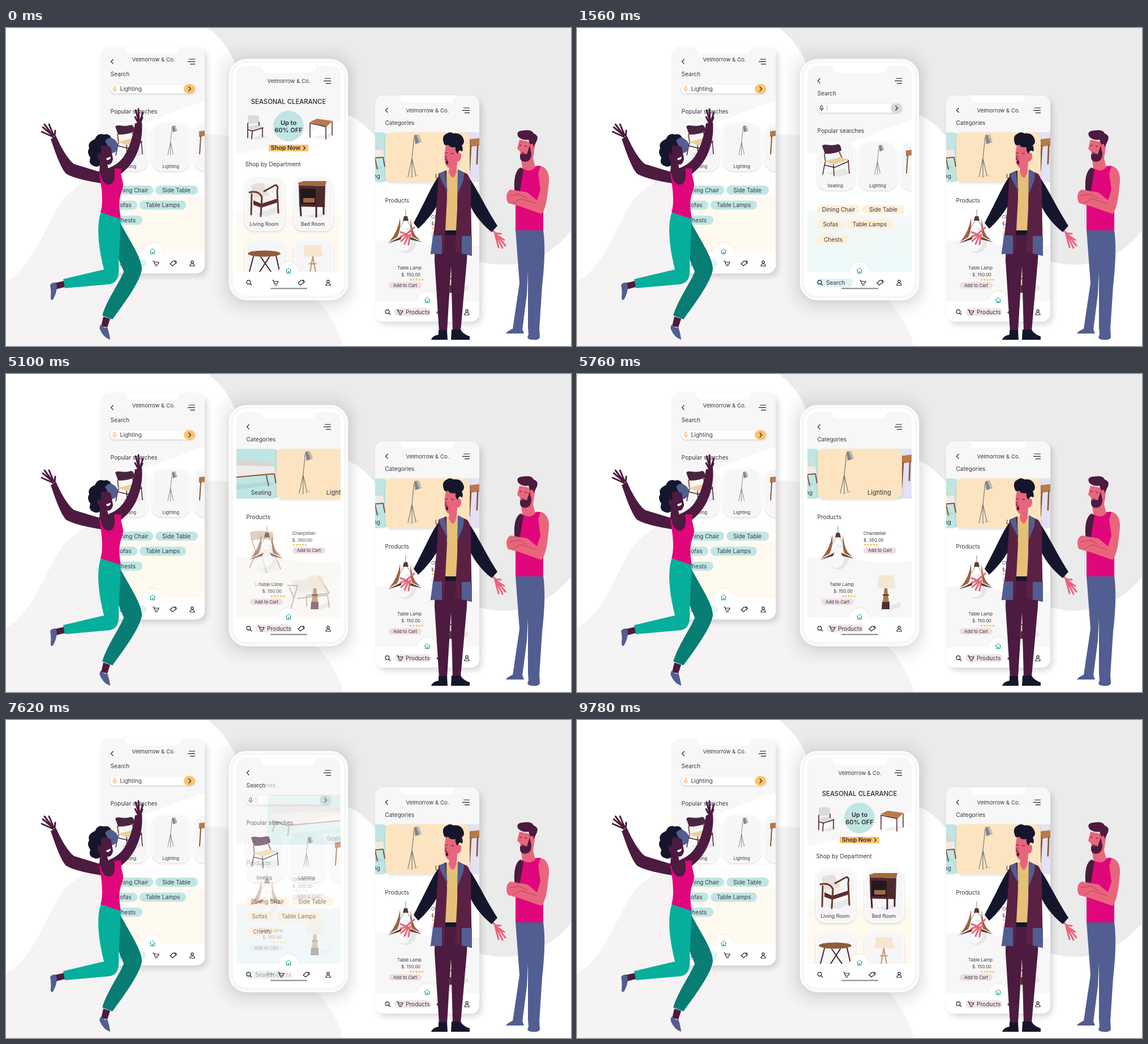
Write an HTML page that moves like this. It is 998 px wide and 561 px high and loops after 9.84 s.

```html
<!DOCTYPE html>
<html lang="en">
<head>
<meta charset="utf-8">
<title>Furniture shop app</title>
<style>
html,body{margin:0;width:100%;height:100%;overflow:hidden;background:#fff}
svg{display:block;width:998px;height:561px;font:10.1px Inter,"Open Sans",sans-serif;fill:#3b3542}
.m{text-anchor:middle}.e{text-anchor:end}
.s{font-size:7.8px}.b{font-weight:600}
.l{fill:none;stroke:#2b1c38;stroke-width:1.2}
.w{fill:none;stroke:#8a5638;stroke-width:2;stroke-linecap:round;stroke-linejoin:round}
.d{fill:none;stroke:#4a2030;stroke-width:2;stroke-linecap:round}
.card{fill:#f6f6f7;stroke:#fff;stroke-width:1.5;filter:drop-shadow(0 2px 2px #0002)}
.chip{fill:var(--chip)}
.hand{fill:none;stroke-width:3;stroke-linecap:round;stroke-linejoin:round}
.cart{transform:translateX(var(--cart,0px))}
.tag{transform:translateX(var(--tag,0px))}
.onSearch{opacity:var(--search,0)}
.onProducts{opacity:var(--products,0)}
.slide{transform:translateX(var(--slide,0px))}
.seats{opacity:calc(1 - var(--lights,1))}
.lights{opacity:var(--lights,1)}
#left{--chip:#bfe6e4;--accent:#fdc46b;--mic:#f5b04c;--tint:url(#cream);--search:1;--cart:29px;--tag:14px}
#right{--products:1;--cart:-25px}
#empty{--chip:#fff0d8;--accent:#d8d8da;--mic:#3b2a3a;--tint:url(#mint)}
#typed{--chip:#fdf4e0;--accent:#fdc46b;--mic:#f5b04c;--tint:none}
</style>
</head>
<body>
<svg viewBox="0 0 998 561">
<defs>
  <linearGradient id="cream" x2="0" y2="1"><stop stop-color="#fffaf0" stop-opacity="0"/><stop offset=".4" stop-color="#fffaf0"/></linearGradient>
  <linearGradient id="mint" x2="0" y2="1"><stop stop-color="#ecfaf8" stop-opacity="0"/><stop offset="1" stop-color="#e9f9f7"/></linearGradient>
  <clipPath id="screen"><rect x="407" y="67" width="184" height="399" rx="15"/></clipPath>

  <g id="back">
    <path fill="#f7f7f8" d="M407 67h184v399H407z"/>
    <path fill="#fff" d="M407 222C470 214 530 180 591 163V330C530 342 470 316 407 324z"/>
  </g>
  <path id="notch" fill="#fff" d="M446 66c5 0 5 4 6 7s4 6 9 6h76c5 0 8-3 9-6s1-7 6-7z"/>
  <path id="menu" class="l" d="M563 89h11M561 93.300h13M565 97.600h9"/>
  <path id="prev" class="l" d="M429.500 89l-4 4.200 4 4.200"/>

  <g id="lamp">
    <path class="l" style="stroke:#777" d="M12 4L8 42M8 42L1 75M8 42L8 76M8 42L15 73"/>
    <path fill="#858585" d="M12 1L20 0 25 13 14 17z"/>
    <path fill="#bbb" d="M16 1L20 0 25 13 21 14z"/>
  </g>
  <g id="table">
    <path fill="#b9794a" d="M0 4L36 0V9L0 14z"/>
    <path class="w" d="M3 13L1 44M12 12L11 36"/>
  </g>

  <g id="nav">
    <circle cx="499" cy="430" r="17" fill="#fff" style="filter:drop-shadow(0 -1px 1px #0001)"/>
    <path fill="#fff" d="M407 430h184v36H407z"/>
    <path class="l" style="stroke:#14a294;stroke-width:1" d="M494 428l5-4.500 5 4.500M495.500 427v5.500h7V427M498 432.500v-3h2v3"/>
    <g class="onSearch"><rect x="422" y="442" width="66" height="15" rx="7.500" fill="#dff3f1"/><text x="440" y="453">Search</text></g>
    <g class="onProducts"><rect x="441" y="442" width="65" height="14" rx="7" fill="#f3e6e9"/><text x="461" y="453">Products</text></g>
    <g class="l">
      <path d="M431 451l3 3"/><circle cx="428.500" cy="448.500" r="3.400"/>
      <path class="cart" d="M470 445h2l2 6h5l2-4h-8M474 453.500h5"/>
      <path class="tag" d="M516 450l5-5h5v4l-6 4.500zM523 446l4 1-1 3"/>
      <circle cx="569" cy="447" r="2.200"/><path d="M565 454q0-4 4-4t4 4z"/>
    </g>
  </g>

  <g id="search">
    <use href="#back"/><path fill="var(--tint)" d="M407 285h184v181H407z"/>
    <use href="#menu"/><use href="#prev"/>
    <text x="424.500" y="119">Search</text>
    <rect x="424" y="133.500" width="150" height="16" rx="8" fill="#fff" style="filter:drop-shadow(0 1px 1.500px #0003)"/>
    <rect x="554" y="133" width="20" height="17" rx="8.500" fill="var(--accent)"/>
    <path class="l" d="M562.500 137.500l4 4-4 4"/>
    <g style="stroke:var(--mic);fill:none"><rect x="430.500" y="136.500" width="3" height="6" rx="1.500"/><path d="M428.500 141q0 3.500 3.500 3.500t3.500-3.500M432 144.500v2.500"/></g>
    <text x="424.500" y="184.800">Popular searches</text>
    <rect class="card" x="425" y="201" width="65" height="84" rx="18"/>
    <rect class="card" x="499" y="201" width="65" height="84" rx="18"/>
    <rect class="card" x="573" y="201" width="65" height="84" rx="18"/>
    <path fill="#0001" d="M440 257l32-10 12 9-20 6z"/>
    <path fill="#4a2540" d="M433 208q2-3 8-2 12 2 20-1 5 0 6 11-10 6-29 6z"/>
    <path class="w" d="M437 222l2 15M463 218l5 11"/>
    <path fill="#e8cf9d" d="M437 235l28-7 15 4-26 9z"/>
    <path class="d" style="stroke-width:1.500" d="M438 238l-4 20M453 241l1 20M479 233l2 23M438 242l17 4 25-11"/>
    <use href="#lamp" transform="translate(525 206) scale(.7)"/>
    <use href="#table" transform="translate(581 212)"/>
    <g class="m s"><text x="456" y="281">Seating</text><text x="531" y="281">Lighting</text></g>
    <g class="chip">
      <rect x="424" y="312" width="76" height="16" rx="8"/><rect x="504" y="312" width="75" height="16" rx="8"/>
      <rect x="424" y="338.500" width="48" height="16" rx="8"/><rect x="476" y="338.500" width="82" height="16" rx="8"/>
      <rect x="424" y="365" width="57" height="16" rx="8"/>
    </g>
    <g class="m">
      <text x="462" y="323.700">Dining Chair</text><text x="541" y="323.700">Side Table</text>
      <text x="448" y="350">Sofas</text><text x="517" y="350">Table Lamps</text><text x="452.500" y="376.600">Chests</text>
    </g>
  </g>
  <text id="query" x="441.500" y="144.700">Lighting</text>

  <text id="stars" fill="#f5a623" style="font-size:5px">★★★★★</text>
  <g id="buy"><rect width="58" height="11" rx="5.500" fill="#eedde3"/><text class="m s" x="29" y="8.300">Add to Cart</text></g>

  <g id="categories">
    <use href="#back"/>
    <path class="seats" fill="url(#cream)" d="M407 285h184v181H407z"/>
    <use href="#menu"/><use href="#prev"/>
    <text x="424.500" y="119">Categories</text>
    <g class="slide">
      <path fill="#e3e1f3" d="M565 132h149v88H565z"/><use href="#table" transform="translate(572 139) scale(1.350)"/>
      <rect x="276" y="132" width="154" height="88" rx="11" fill="#bfe6e4"/>
      <path fill="#0001" d="M295 202l115-12 12 5-90 12z"/>
      <path fill="#d9d5d0" d="M280 142q70 6 135 15l4 12-110 2-25-9z"/>
      <path fill="#efece8" d="M283 167l60-6 78 2 2 12-112 11-26-10z"/>
      <path class="w" d="M285 177l26 9 110-10M290 180l-5 16M314 187l-2 17M407 179l4 18M421 176l3 16"/>
      <text x="380" y="213">Seating</text>
      <rect x="425" y="132" width="149" height="88" rx="11" fill="#fde4c0" style="filter:drop-shadow(0 2px 2px #0002)"/>
      <path fill="#0001" d="M466 212l16-7 4 4z"/><use href="#lamp" x="464" y="136"/>
      <text x="513" y="212.500" style="font-size:11px">Lighting</text>
    </g>
    <text x="424.500" y="256">Products</text>
    <use href="#stars" x="506" y="303"/><use href="#buy" x="506" y="306"/>
    <use href="#stars" x="467" y="393.500"/><use href="#buy" x="431" y="396.500"/>
    <g class="seats s">
      <text x="504" y="283.500">Dining Chair</text><text x="504" y="295.500">$. 250.00</text>
      <text class="e" x="489" y="374">Lounge Chair</text><text class="e" x="487" y="386">$. 350.00</text>
      <path fill="#0001" d="M437 345l38-8 12 6-25 9z"/>
      <path fill="#a77950" d="M431 279q17-5 40 0l2 14q-20-4-40 1z"/>
      <path fill="#d7b48c" d="M433 314l37-6 15 8-35 8z"/>
      <path class="w" d="M434 292l8 24-12 26M452 322l8 28M469 292l3 18 13 34"/>
      <path fill="#ddd8d0" d="M505 365l53-6 11 28-57 4z"/><path fill="#eeeae4" d="M508 386l50-4 12 6-55 6z"/>
      <path class="w" d="M498 373h17l-12 42M515 396l53-6 3 21M553 357l18 30-40 4v19M501 377l7 17"/>
    </g>
    <g class="lights s">
      <text x="506" y="283.500">Chandelier</text><text x="506" y="295.500">$. 350.00</text>
      <text class="e" x="489" y="374">Table Lamp</text><text class="e" x="487" y="386">$. 150.00</text>
      <ellipse cx="461" cy="323" rx="19" ry="22" fill="#e6e6e8"/><ellipse cx="457" cy="322" rx="15" ry="20" fill="#f8f8f8"/>
      <path class="l" style="stroke:#777;stroke-width:.9" d="M461 268v17M461 283l-13 22M461 283l13 22"/>
      <path fill="#9b633f" d="M451 283q2 20-5 34l-14 8q15-17 19-42zM470 283q1 20 8 31l9 9-15-7q-4-16-2-33z"/>
      <path fill="#5b3a35" d="M429 328l26-13-3 6zM490 326l-24-11 3 6zM458 280h6l2 8h-10z"/>
      <path fill="#0001" d="M546 411l25-9 1 8-18 7z"/>
      <path fill="#f3e8d3" d="M534 355h25l4 23h-33z"/><path fill="#ad7850" d="M543 378h5l3 24h-11z"/>
      <path fill="#4f3030" d="M539 402h13v13h-14zM540 389h11v2h-11z"/>
    </g>
  </g>

  <g id="home">
    <use href="#back"/><path fill="url(#cream)" d="M407 285h184v181H407z"/><use href="#menu"/>
    <text class="m" x="499.500" y="97" style="font-size:9.600px">Velmorrow &amp; Co.</text>
    <g class="m b" fill="#2f2836">
      <text x="499" y="134" style="font-size:11.300px;font-weight:500">SEASONAL CLEARANCE</text>
      <circle cx="499" cy="173" r="27" fill="#bfe6e3"/>
      <text x="499" y="170.500" style="font-size:11px">Up to</text><text x="499" y="184" style="font-size:11px">60% OFF</text>
      <path fill="#fdc46b" d="M464 206h70v11.500h-70z"/><text x="494" y="215.400" style="font-size:10.600px">Shop Now</text>
    </g>
    <path class="l" d="M525 208l3.500 3.700-3.500 3.700"/>
    <path fill="#0001" d="M432 195l21-8 7 5-15 5zM540 193l30-7 7 4-12 6z"/>
    <path fill="#dedad8" d="M427 155q10-3 20 0v13l-20 2zM426 174l20-4 9 5-20 6z"/>
    <path class="d" style="stroke-width:1.600" d="M427 168v26M447 166v6M435 181l-1 15M453 177v15M427 179l8 3 19-6"/>
    <path fill="#b9794a" d="M536 166l13-6 28 4-11 10z"/><path class="d" style="stroke-width:1.500" d="M537 168v25M565 174v22M576 166v23M537 168l28 6"/>
    <text x="422.500" y="244.300">Shop by Department</text>
    <rect class="card" x="423" y="262" width="68" height="95" rx="16"/><rect class="card" x="509" y="262" width="68" height="95" rx="16"/>
    <rect class="card" x="423" y="374" width="68" height="95" rx="16"/><rect class="card" x="509" y="374" width="68" height="95" rx="16"/>
    <path fill="#0001" d="M440 328l36-12 9 7-24 10zM525 332l32-5 10 3-20 5z"/>
    <path fill="#e6e0dc" d="M432 278q12-6 23-4l12 25-28 5z"/><path fill="#f3efeb" d="M437 300l28-5 14 5-29 9z"/>
    <path fill="#5b2c30" d="M437 304l14 6 28-9v7l-28 9-14-5z"/>
    <path class="w" style="stroke:#6b3a2c;stroke-width:3" d="M430 290q16-4 22 8l-2 34M434 293l-1 36M456 288l20-11q6 2 3 10l2 39"/>
    <path fill="#4f2a2c" d="M517 277l47 2-1 37-45-1z"/><path fill="#241820" d="M520 283l27 1v27l-27-1z"/>
    <path fill="#a06a42" d="M516 273l10-3h40l-2 9-47-1zM525 300h20v8h-20z"/>
    <path class="d" style="stroke-width:3" d="M520 314l1 17M548 316v17M561 314v14"/>
    <ellipse cx="456" cy="398" rx="29" ry="5.500" fill="#925c3a"/><path class="d" d="M437 403l-7 27M450 404l18 26M465 404l-17 26M477 402l6 26"/>
    <path fill="#f8e6d0" d="M528 383h28l4 20h-35z"/><path class="w" style="stroke:#c89468" d="M542 403l-5 28M542 403l5 28M536 416h12"/>
    <g class="m" style="font-size:8.800px"><text x="456" y="349">Living Room</text><text x="542" y="349">Bed Room</text></g>
  </g>
</defs>

<path fill="#ebebeb" d="M357 0C385 22 400 45 410 78C440 165 570 130 618 160C700 215 740 385 836 412C900 428 955 410 998 358V0z"/>
<path fill="#f6f3f4" d="M0 447C55 420 75 325 110 292C180 235 290 175 392 190C470 215 490 410 550 480Q585 520 595 561H0z"/>

<g id="left" transform="translate(-240 -34)">
  <rect x="407" y="67" width="184" height="400" rx="15" fill="#fff" style="filter:drop-shadow(5px 6px 5px #0002)"/>
  <g clip-path="url(#screen)"><use href="#search"/><use href="#query"/><use href="#notch"/><use href="#nav"/></g>
  <text class="m" x="500.500" y="92.500" style="font-size:9.600px">Velmorrow &amp; Co.</text>
</g>

<rect x="372" y="34" width="248" height="472" rx="46" fill="#00000009" style="filter:blur(7px)"/>
<rect x="395" y="56" width="208" height="423" rx="30" fill="#f6f7f7" stroke="#fff" stroke-width="2.500" style="filter:drop-shadow(0 4px 9px #0002)"/>
<rect x="401" y="61" width="196" height="411" rx="24" fill="#fff"/>
<g clip-path="url(#screen)">
  <g id="empty"><use href="#search"/><path stroke="#e79aa9" d="M441.500 136.500v10"/></g>
  <g id="typed"><use href="#search"/><use href="#query"/></g>
  <use href="#home" id="start"/>
  <use href="#categories" id="shop"/>
  <use href="#notch"/><use href="#nav" id="bar"/>
  <rect x="467" y="458.500" width="65" height="2" rx="1" fill="#85858a"/>
</g>

<g id="right" transform="translate(245 52)">
  <rect x="407" y="67" width="184" height="399" rx="15" fill="#fff" style="filter:drop-shadow(5px 6px 5px #0002)"/>
  <g clip-path="url(#screen)"><use href="#categories"/><use href="#notch"/><use href="#nav"/></g>
  <text class="m" x="499.500" y="97" style="font-size:9.600px">Velmorrow &amp; Co.</text>
</g>

<g id="dancer">
  <path fill="#077d74" d="M199 338C216 372 240 404 240 426C236 450 204 492 188 514L170 507C180 476 200 450 208 430L194 395z"/>
  <path fill="#4c1b3f" d="M172 509l12 4-5 15-11-2zM103 446l-17 4 2 11 16-4z"/>
  <path fill="#525e91" d="M168 523q-4 3-2 9 6 14 18 18-1-10-5-22-5 3-11-5zM88 449q-9 0-10 5 2 9 1 19-1 9 4 6 5-9 6-16 2-6-1-14z"/>
  <path fill="#06ae9c" d="M168 324C158 350 165 395 173 426L101 443L104 459L183 452C199 449 200 435 199 415L203 337z"/>
  <path fill="#4c1b3f" d="M79 196L88 190C98 212 108 230 120 240L166 254L188 244C208 234 220 214 228 168L240 166C242 188 237 210 229 226C221 242 208 255 196 262L185 282L168 274C146 270 122 266 106 257C96 246 86 216 79 196z"/>
  <path class="hand" stroke="#4c1b3f" d="M83 192L63 183M83 190L65 175M83 190L68 170M84 189L76 170M86 190L87 181M234 168L228 157M235 166L229 145M235 165L234 143M237 164L242 149M236 170L241 158"/>
  <path fill="#e0067c" d="M164 253L167 250C166 270 176 278 184 276C193 274 193 258 191 248L204 248C201 260 207 268 207 278C204 294 196 300 203 337L167 325C172 308 170 285 164 253z"/>
  <path fill="#15162c" d="M157 196q5-12 16-8 9-3 13 6 10 3 7 15-8 20-20 24-8 16-19 10-9-4-5-14-7-10-2-17-4-10 10-16z"/>
  <path fill="#525e91" d="M175 199q8-9 15-3 9 5 7 14-1 10-11 11z"/>
  <path fill="#4c1b3f" d="M168 208q10-2 17 2l4 21q-2 11-10 10l3 14-17 2 1-22q-7-7-3-14 4-2 5 4z"/>
  <path fill="#fff" d="M177 230l8-3q0 6-7 6z"/>
  <path class="l" style="stroke-width:.8" d="M174 216l5-1M181 214l4-1"/>
</g>

<g id="visitor">
  <path fill="#4c1b3f" d="M758 362H816L814 410L803 535H789L786 420L779 536H765L757 410z"/>
  <path fill="#15162c" d="M764 533h15l1 17h-29q2-7 13-9zM787 532h16q4 8 16 12v6h-33z"/>
  <path class="hand" stroke="#e9657c" d="M721 352L707 364L697 360M709 364L697 368M709 366L698 376M711 366L704 381M714 364L711 382M857 354L868 366L880 374M868 366L882 384M866 366L877 388M864 364L870 387M864 362L874 363"/>
  <path fill="#15162c" d="M768 258C756 268 746 295 720 344L728 354C748 336 762 315 771 295zM812 258C826 270 842 308 868 349L858 360C838 344 824 326 814 300z"/>
  <path fill="#e5c078" d="M775 252h25v111h-25z"/><path fill="#15162c" d="M775 357h24v8h-24z"/>
  <path fill="#5a2145" d="M764 257L778 251L779 300L774 396L750 399C758 350 762 300 764 257zM798 250L814 257Q823 265 821 295L823 402L793 395L797 320z"/>
  <path fill="#525e91" d="M765 257l10-5 5 37-12-22zM798 249l11 6-1 13-10 25zM754 366h16v33l-20-1zM805 367h18v34l-18-3z"/>
  <path fill="#e9657c" d="M777 207C772 230 775 244 783 247L782 254Q790 275 796 252L797 236Q805 235 804 223Q801 217 797 222L796 205z"/>
  <path fill="#15162c" d="M773 202q-4-12 6-16 5-4 11 0 16-2 19 13 0 6-4 8 3 6 1 11-6-5-8 4-5-4-4-12-9 2-13-4-7 3-8-4z"/>
  <ellipse cx="779" cy="237" rx="2.200" ry="3.500" fill="#4c1b3f"/><path class="l" style="stroke-width:1" d="M776 221l4-1M786 221l5 1M778 225l-2 7h4"/>
</g>

<g id="friend">
  <path fill="#525e91" d="M900 356H949C953 385 951 420 947 455L942 532L922 531L922 430L920 470L912 533L895 531L907 450zM896 530l16 1 3 8h-32q2-4 13-9zM922 529h20l1 17q-2 5-12 4-14 0-8-9z"/>
  <path fill="#e0067c" d="M909 248L940 243C957 243 960 262 957 278L949 312V357H900V260z"/>
  <path fill="#4c1b3f" d="M909 246C896 253 897 280 899 293L908 288L914 250z"/>
  <path fill="#e9657c" d="M944 244C958 246 961 262 958 280C956 302 953 320 946 328L906 314L887 309C883 303 882 290 891 285L921 290L938 304L944 285L940 257zM907 197L903 213L908 218L912 247Q925 256 935 246L931 230L935 203z"/>
  <path class="l" style="stroke:#b83f5e;stroke-width:1" d="M890 296l17-3 14 8M895 309l14-8 28 9"/>
  <path fill="#4c1b3f" d="M908 223q7-3 12 0l5-16 3 14q0 14-11 15-8 0-9-7z"/>
  <path fill="#4c1b3f" d="M904 190q-3-8 8-9 17-3 20 5 9 3 6 12l-6 12q-1-9-6-4l-3-9q-11 2-18-5z"/>
  <path class="l" style="stroke-width:1" d="M907 207h4M916 208l4 1M910 221l5-1"/>
</g>
</svg>
<script>
const LOOP = 9840, NEXT = 149, FAR = 286;
const $ = id => document.getElementById(id);
const ramp = (t, a, b) => {
  const p = Math.min(1, Math.max(0, (t - a) / (b - a)));
  return p * p * (3 - 2 * p);
};
const vars = (el, set) => {
  for (const k in set) el.style.setProperty('--' + k, set[k]);
};

function draw(now) {
  const t = now % LOOP;
  const home = 1 - ramp(t, 300, 1000) + ramp(t, 8600, 9300);
  const enter = ramp(t, 3700, 4200), leave = ramp(t, 7200, 7900);
  const shop = enter - leave;
  const lights = ramp(t, 4700, 5370);
  const search = Math.max(0, 1 - home - shop);

  $('start').style.opacity = home;
  $('shop').style.opacity = shop;
  $('typed').style.opacity = t < 6000 ? ramp(t, 3000, 3500) : 0;
  const slide = NEXT * (1 - lights) + (FAR - NEXT) * (1 - enter) + FAR * leave;
  vars($('shop'), {slide: slide + 'px', lights});
  vars($('bar'), {search, products: shop, cart: 29 * search - 25 * shop + 'px', tag: 14 * search + 'px'});
  requestAnimationFrame(draw);
}
requestAnimationFrame(draw);
</script>
</body>
</html>
```
